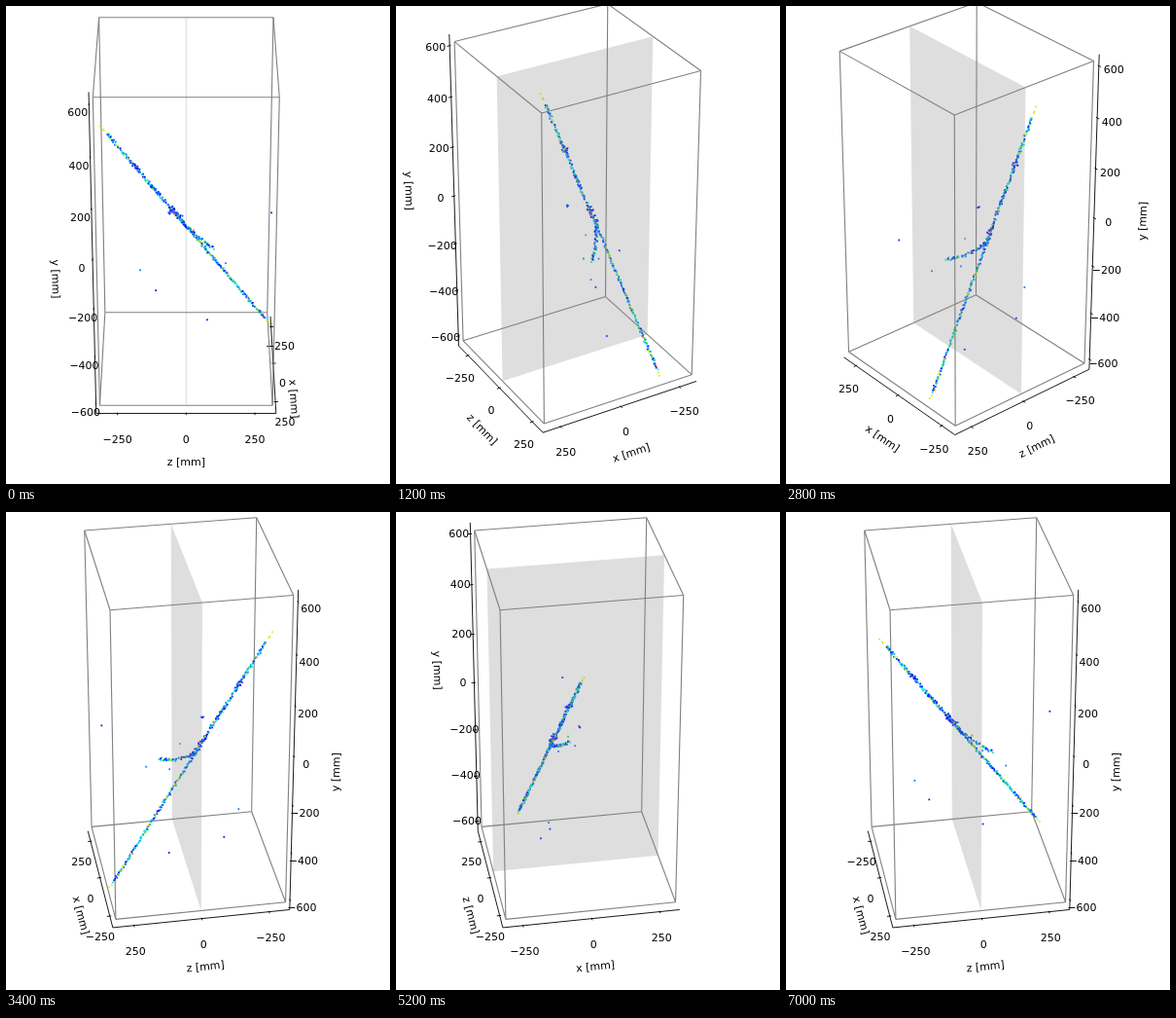
Animation of 395 by 491 pixels, one loop 7.2 s. Source, as an HTML page with a canvas:

```html
<!DOCTYPE html>
<html>
<head>
<meta charset="utf-8">
<style>
html, body { margin: 0; width: 100%; height: 100%; overflow: hidden; background: #fff; }
canvas { display: block; }
</style>
</head>
<body>
<canvas id="stage" width="395" height="491"></canvas>
<script>
const ctx = document.getElementById('stage').getContext('2d');
const STEP_MS = 200, STEPS = 36;
const CENTER = [185.3, 212], ZOOM = 2390, DISTANCE = 10;
const SIN_E = Math.sin(Math.PI / 6), COS_E = Math.cos(Math.PI / 6);

// Points are [x, z, y] in scene units; y is vertical.
const HALF = [0.3735, 0.3735, 0.747];
const RANGE = [310, 314, 618];
const PAD = 25 / 24;
const TICK_DROP = 4.4, LABEL_DROP = 1;
const AXES = [
  { name: 'x [mm]', dim: 0, tickDim: 1, ticks: [-250, 0, 250], labelGap: 1.5 },
  { name: 'z [mm]', dim: 1, tickDim: 0, ticks: [-250, 0, 250], labelGap: 1.5 },
  { name: 'y [mm]', dim: 2, tickDim: 0, ticks: [-600, -400, -200, 0, 200, 400, 600], labelGap: 2.4 }
];

let seed = 77;
function random() {
  seed = (seed * 1664525 + 1013904223) >>> 0;
  return seed / 4294967296;
}
const spread = size => (random() + random() - 1) * size;
const mix = (a, b, t) => a.map((v, i) => v + (b[i] - v) * t);

// Higher charge moves the colour from blue through cyan and green to red.
function chargeColor(blueShare = 0.45) {
  const r = random();
  if (r < blueShare) return `hsl(${218 + random() * 22},100%,${46 + random() * 6}%)`;
  const rest = (r - blueShare) / (1 - blueShare);
  if (rest < 0.6) return `hsl(${180 + random() * 32},100%,48%)`;
  if (rest < 0.82) return `hsl(${115 + random() * 55},75%,52%)`;
  if (rest < 0.95) return `hsl(${55 + random() * 25},88%,52%)`;
  return `hsl(${10 + random() * 25},95%,52%)`;
}

const hits = [];
function addHit(pos, jitter, color) {
  hits.push({ pos: pos.map(v => v + spread(jitter)), color });
}

function buildHits() {
  const top = [-0.033, -0.363, 0.402], bottom = [-0.205, 0.374, -0.694];
  const blue = '#1020f0', sky = '#1080ff', yellow = '#d8f020';
  const along = (from, to, count, jitter, blueShare) => {
    for (let i = 0; i < count; i++) {
      const t = from + (to - from) * (i + random()) / count;
      addHit(mix(top, bottom, t), jitter, chargeColor(blueShare));
    }
  };
  along(0.15, 0.22, 14, 0.01, 0.8);
  along(0.28, 0.34, 14, 0.009, 0.8);
  along(0.4, 0.48, 36, 0.013, 0.85);
  along(0.035, 0.5, 125, 0.007, 0.45);
  along(0.5, 0.98, 125, 0.006, 0.35);
  for (const t of [0, 0.015, 0.02, 0.99, 1]) addHit(mix(top, bottom, t), 0.003, yellow);
  for (const dx of [-0.018, -0.012, 0.014]) {
    const [x, z, y] = mix(top, bottom, 0.195);
    addHit([x + dx, z, y], 0.003, blue);
  }

  const vertex = mix(top, bottom, 0.46);
  const bend = [-0.0795, 0.046, -0.17], tip = [-0.007, 0.121, -0.186];
  for (let i = 0; i < 44; i++) {
    const t = (i + random()) / 44;
    addHit(mix(mix(vertex, bend, t), mix(bend, tip, t), t), 0.007, chargeColor(0.65 - 0.4 * t));
  }

  const strays = [
    [0.003, 0.367, 0, blue], [-0.102, 0.0943, -0.613, blue], [-0.18, -0.136, -0.507, blue],
    [-0.156, -0.204, -0.386, sky], [0.0256, 0.172, -0.24, sky], [-0.0645, 0.0841, -0.208, sky],
    [-0.0298, 0.0317, -0.106, '#60c040'],
    [0.001, -0.075, -0.001, blue], [0.001, -0.066, 0, sky], [0.004, -0.071, -0.005, blue]
  ];
  for (const [x, z, y, color] of strays) addHit([x, z, y], 0, color);
}

let cosA = 1, sinA = 0;
function project([x, z, y]) {
  const side = z * cosA - x * sinA;
  const front = x * cosA + z * sinA;
  const scale = ZOOM / (DISTANCE - front * COS_E - y * SIN_E);
  return [CENTER[0] + side * scale, CENTER[1] - (y * COS_E - front * SIN_E) * scale];
}

function path(points) {
  ctx.beginPath();
  points.forEach(p => ctx.lineTo(...project(p)));
}
function line(a, b) {
  path([a, b]);
  ctx.stroke();
}

function drawText(text, x, y, angle = 0) {
  ctx.save();
  ctx.translate(x, y);
  ctx.rotate(angle);
  ctx.fillText(text, 0, 0);
  ctx.restore();
}

function drawAxis({ name, dim, tickDim, ticks, labelGap }, near) {
  const sign = dim === 0 ? [0, near[1], -1] : dim === 1 ? [near[0], 0, -1] : [near[0], -near[1], 0];
  const at = (value, gap) => HALF.map((h, i) => i === dim ? value : sign[i] * h * (PAD + gap / 6));
  const end = HALF[dim] * PAD;
  const from = at(-end, 0), to = at(end, 0);
  ctx.strokeStyle = '#000';
  ctx.lineWidth = 0.9;
  line(from, to);

  for (const tick of ticks) {
    const value = tick / RANGE[dim] * HALF[dim];
    const outer = at(value, 0), inner = at(value, 0);
    const unit = sign[tickDim] * HALF[tickDim] / 6;
    outer[tickDim] += 0.2 * unit;
    inner[tickDim] -= 0.1 * unit;
    line(inner, outer);
    const [x, y] = project(at(value, 0.7));
    drawText(String(tick).replace('-', '\u2212'), x, y + TICK_DROP);
  }

  const a = project(from), b = project(to);
  let angle = Math.atan2(b[1] - a[1], b[0] - a[0]);
  if (angle >= Math.PI / 2) angle -= Math.PI;
  if (angle < -Math.PI / 2) angle += Math.PI;
  const [x, y] = project(at(0, labelGap));
  drawText(name, x, y + LABEL_DROP, angle);
}

function drawBox() {
  ctx.strokeStyle = '#808080';
  ctx.lineWidth = 1.1;
  for (let dim = 0; dim < 3; dim++) {
    for (const p of [-1, 1]) for (const q of [-1, 1]) {
      const a = [0, 0, 0];
      a[dim] = -HALF[dim];
      a[(dim + 1) % 3] = p * HALF[(dim + 1) % 3];
      a[(dim + 2) % 3] = q * HALF[(dim + 2) % 3];
      const b = a.slice();
      b[dim] = HALF[dim];
      line(a, b);
    }
  }
}

function drawPlane() {
  const [w, , h] = HALF;
  path([[-w, 0, -h], [w, 0, -h], [w, 0, h], [-w, 0, h]]);
  ctx.closePath();
  ctx.fillStyle = ctx.strokeStyle = 'rgba(128,128,128,0.26)';
  ctx.fill();
  const edgeOn = Math.abs(sinA) < 1e-9;
  if (edgeOn) ctx.stroke();
}

function draw(step) {
  const angle = step / STEPS * 2 * Math.PI;
  cosA = Math.cos(angle);
  sinA = Math.sin(angle);
  const near = [cosA, sinA].map(v => v < -1e-9 ? -1 : 1);

  ctx.fillStyle = '#fff';
  ctx.fillRect(0, 0, 395, 491);
  ctx.fillStyle = '#000';
  ctx.font = '11px "DejaVu Sans", sans-serif';
  ctx.textAlign = 'center';
  ctx.textBaseline = 'middle';
  AXES.forEach(axis => drawAxis(axis, near));
  drawBox();
  for (const { pos, color } of hits) {
    const [x, y] = project(pos);
    ctx.fillStyle = color;
    ctx.fillRect(x - 0.9, y - 0.9, 1.8, 1.8);
  }
  drawPlane();
}

let shown = -1;
function tick() {
  const step = Math.floor(performance.now() / STEP_MS) % STEPS;
  if (step !== shown) draw(shown = step);
  requestAnimationFrame(tick);
}

buildHits();
tick();
</script>
</body>
</html>
```
